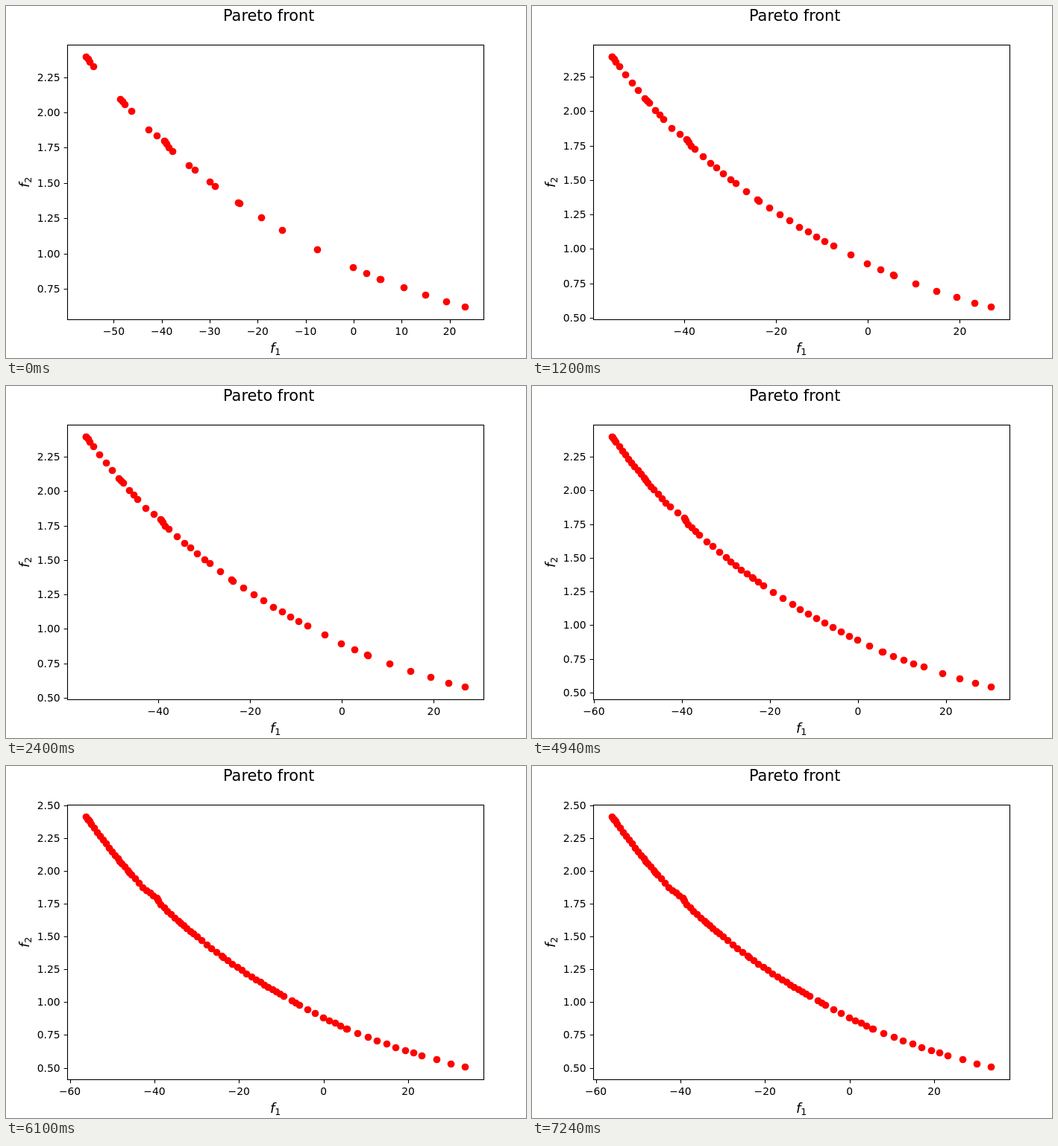
An HTML page that plays this animation: 697 px wide and 473 px high, repeating every 8 s.

```html
<!DOCTYPE html>
<html lang="en">
<head>
<meta charset="utf-8">
<title>Pareto front</title>
<style>
  html, body { margin: 0; width: 100%; height: 100%; overflow: hidden; background: #fff; }
  svg { display: block; font-family: "DejaVu Sans", sans-serif; font-size: 13.89px; }
  .line { fill: none; stroke: #000; stroke-width: 1.11; }
  .dots { fill: #f00; }
  .title { font-size: 20.83px; text-anchor: middle; }
  .label { font-size: 18.06px; }
  .label .var { font-style: oblique; }
  .label .sub { font-size: 12.64px; }
</style>
</head>
<body>
<svg id="plot" width="697" height="473" viewBox="0 0 697 473">
  <text class="title" x="352.2" y="20">Pareto front</text>
  <text class="label" x="354" y="466"><tspan class="var">f</tspan><tspan class="sub" dy="2.7">1</tspan></text>
  <text class="label" transform="translate(31 244) rotate(-90)"><tspan class="var">f</tspan><tspan class="sub" dy="2.7">2</tspan></text>
</svg>
<script>
const LOOP = 8000;
const BOX = { left: 82, top: 51.6, right: 640, bottom: 421.2 };
const MARGIN = 0.05;
const TICK = 4.86;

// Each stage widens the front, lowers its right side and splits its widest gaps
const stages = [
  { start: 0,    from: -55.75, to: 23.13, splits: 0,  drift: 0 },
  { start: 1200, from: -55.75, to: 26.7,  splits: 14, drift: 0.012 },
  { start: 3200, from: -55.85, to: 30.15, splits: 14, drift: 0.021 },
  { start: 6100, from: -56.15, to: 33.35, splits: 18, drift: 0.028 }
];

// Key points of the front, joined by exponential arcs
const keys = [
  [-55.75, 2.393], [-48.65, 2.096], [-42.75, 1.881], [-39.5, 1.8], [-38.55, 1.752],
  [-34.35, 1.628], [-24, 1.36], [-7.6, 1.031], [5.5, 0.82], [23.13, 0.623], [33.35, 0.538]
];

// Positions of the first solutions
const seeds = [
  -55.4, -55, -54.25, -48.65, -48.2, -47.7, -46.35, -42.75, -41.05, -39.5, -39.35, -39.05, -38.55,
  -37.75, -34.35, -33.1, -30, -28.9, -24.1, -23.8, -19.3, -14.95, -7.6, -0.15, 2.65, 5.4, 5.6,
  10.4, 14.9, 19.25
];

function front(x, drift = 0) {
  const i = Math.max(1, keys.findIndex(k => k[0] >= x));
  const [xa, ya] = keys[i - 1], [xb, yb] = keys[i];
  const y = ya * (yb / ya) ** ((x - xa) / (xb - xa));
  return y - drift * (x + 56) / 80;
}

function splitWidest(xs) {
  let widest = 1;
  const drop = i => front(xs[i - 1]) - front(xs[i]);
  for (let i = 2; i < xs.length; i++) if (drop(i) > drop(widest)) widest = i;
  xs.splice(widest, 0, (xs[widest - 1] + xs[widest]) / 2);
}

function grow(xs, { from, to, splits }) {
  const next = [from, ...xs, to].sort((a, b) => a - b);
  for (let i = 0; i < splits; i++) splitWidest(next);
  return next;
}

// Axis that maps [low, high] plus a margin on both sides to pixels [a, b]
function axis(low, high, a, b, step) {
  const pad = (high - low) * MARGIN;
  const min = low - pad, max = high + pad;
  const ticks = [];
  for (let v = Math.ceil(min / step) * step; v <= max; v += step) ticks.push(v);
  return { ticks, at: v => a + (b - a) * (v - min) / (max - min) };
}

function add(parent, name, attrs, text) {
  const el = document.createElementNS("http://www.w3.org/2000/svg", name);
  for (const key in attrs) el.setAttribute(key, attrs[key]);
  if (text) el.textContent = text;
  return parent.appendChild(el);
}

const snap = v => Math.round(v) + 0.5;
const plot = document.getElementById("plot");

function build({ from, to, drift }, xs) {
  const group = add(plot, "g", { visibility: "hidden" });
  const xAxis = axis(from, to, BOX.left, BOX.right, to - from < 80 ? 10 : 20);
  const yAxis = axis(front(to, drift), front(from, drift), BOX.bottom, BOX.top, 0.25);

  const dots = add(group, "g", { class: "dots" });
  for (const x of xs)
    add(dots, "circle", { cx: snap(xAxis.at(x)), cy: snap(yAxis.at(front(x, drift))), r: 4.86 });

  let ticks = "";
  for (const x of xAxis.ticks) {
    ticks += `M${snap(xAxis.at(x))} ${snap(BOX.bottom)}v${TICK}`;
    add(group, "text", { x: xAxis.at(x), y: 442, "text-anchor": "middle" },
      x.toFixed(0).replace("-", "\u2212"));
  }
  for (const y of yAxis.ticks) {
    ticks += `M${snap(BOX.left)} ${snap(yAxis.at(y))}h${-TICK}`;
    add(group, "text", { x: 72.6, y: Math.round(yAxis.at(y) + 5), "text-anchor": "end" }, y.toFixed(2));
  }
  add(group, "path", { class: "line", d: ticks });
  return group;
}

let xs = seeds;
const groups = stages.map(stage => build(stage, xs = grow(xs, stage)));
add(plot, "rect", {
  class: "line", x: snap(BOX.left), y: snap(BOX.top),
  width: snap(BOX.right) - snap(BOX.left), height: snap(BOX.bottom) - snap(BOX.top)
});

let shown = -1;
function draw() {
  const t = performance.now() % LOOP;
  const now = stages.filter(s => s.start <= t).length - 1;
  if (now !== shown) {
    groups.forEach((g, i) => g.setAttribute("visibility", i === now ? "visible" : "hidden"));
    shown = now;
  }
  requestAnimationFrame(draw);
}
draw();
</script>
</body>
</html>
```
